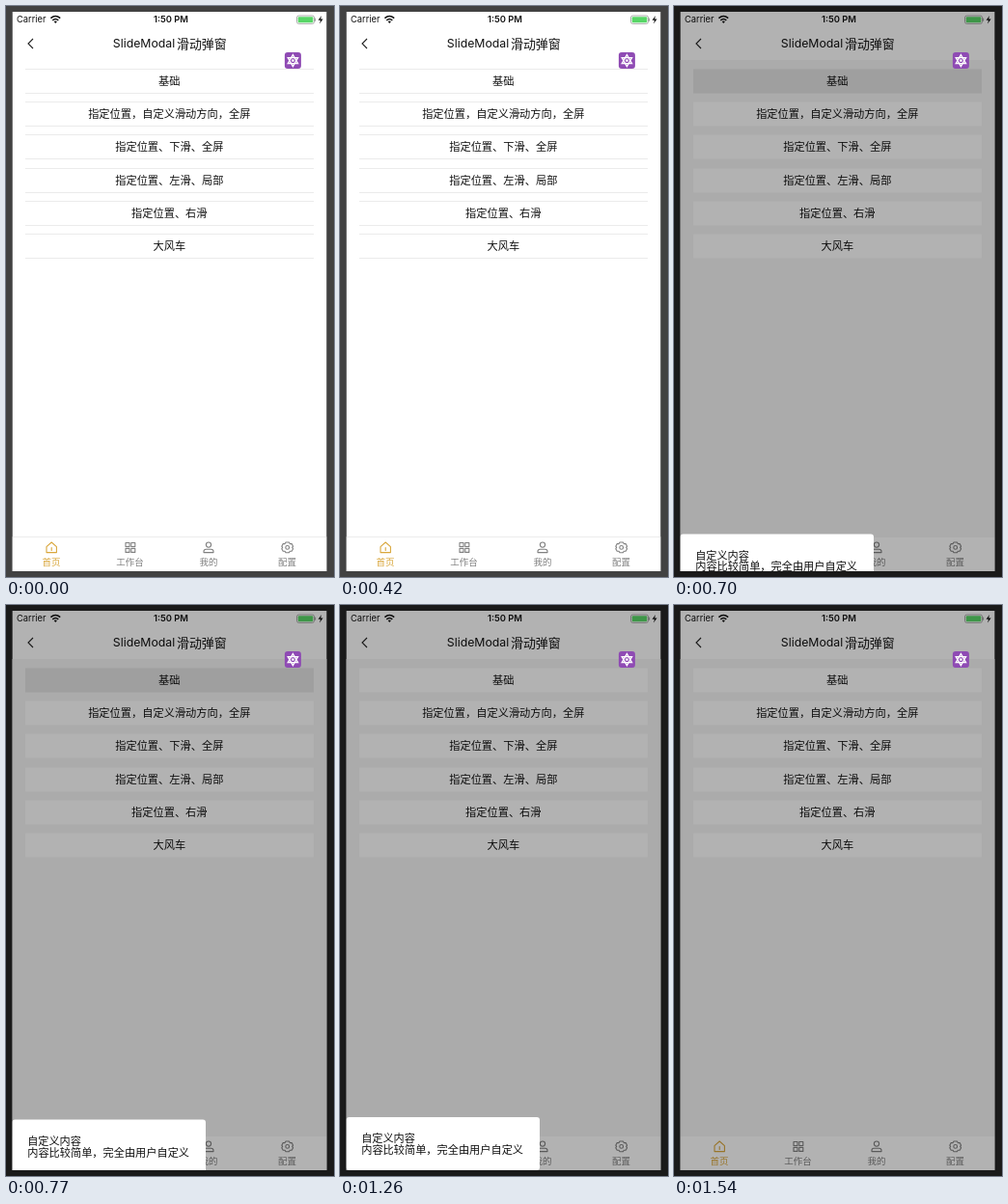
Write an HTML page that moves like this. It is 340 px wide and 592 px high and loops after 1610 ms.

```html
<!DOCTYPE html>
<html lang="zh-CN">
<head>
<meta charset="utf-8">
<title>SlideModal</title>
<style>
  html, body { margin: 0; width: 100%; height: 100%; overflow: hidden; }
  svg { display: block; width: 340px; height: 592px; }
  text { font-family: Inter, "Noto Sans CJK SC", "Noto Sans CJK", sans-serif; fill: #111; }
  .mid { text-anchor: middle; }
  .line { fill: none; stroke: #808080; stroke-width: 1.1; stroke-linejoin: round; stroke-linecap: round; }
</style>
</head>
<body>
<svg viewBox="0 0 340 592">
  <defs>
    <clipPath id="screen"><rect x="6.5" y="6" width="326" height="580"/></clipPath>
  </defs>
  <rect id="bezel" width="340" height="592"/>
  <g clip-path="url(#screen)">
    <rect x="6.5" y="6" width="326" height="580" fill="#fff"/>
    <rect id="body" x="6.5" y="56" width="326" height="495" fill="#f4f4f4"/>

    <text x="11" y="17.3" font-size="9.3">Carrier</text>
    <g fill="none" stroke="#111" stroke-width="1.6">
      <path d="M46.4 12.7Q51.3 8.3 56.2 12.7"/>
      <path d="M48.3 14.8Q51.3 12.2 54.3 14.8"/>
    </g>
    <path d="M49.6 16.1Q51.3 14.9 53 16.1L51.3 17.9Z" fill="#111"/>
    <text class="mid" x="171" y="17.4" font-size="9.4" font-weight="600">1:50 PM</text>
    <rect x="301.5" y="10" width="18" height="8.4" rx="2" fill="#fff" stroke="#999" stroke-width=".8"/>
    <rect x="302.7" y="11.2" width="15.6" height="6" rx="1" fill="#58d667"/>
    <path d="M320.6 12.6V15.8" stroke="#999"/>
    <path d="M327 10L323.6 14.7H326L325 18.4L328.6 13.4H326.2Z" fill="#111"/>

    <path d="M28 34L23 39L28 44" fill="none" stroke="#222" stroke-width="1.1"/>
    <text x="110.8" y="43.4" font-size="12.3">SlideModal</text>
    <text x="177" y="43.6" font-size="12.9">滑动弹窗</text>

    <g id="rows"></g>

    <rect x="6.5" y="551" width="326" height="36" fill="#fff"/>
    <path id="tabEdge" d="M6.5 550.5H332.5" stroke="#ececec"/>
    <path class="line" style="stroke:#d9a73c" d="M42 560.6L47.2 556L52.4 560.6V566.6H42ZM47.2 561.6V564.4"/>
    <path class="line" d="M124 556.5h4v4h-4zM129.8 556.5h4v4h-4zM124 562.4h4v4h-4zM129.8 562.4h4v4h-4z"/>
    <g class="line">
      <circle cx="210" cy="558.6" r="2.6"/>
      <path d="M205 566.6V565.4Q205 563.2 207.4 563.2H212.6Q215 563.2 215 565.4V566.6Z"/>
      <path d="M290 556H293.4L294.3 557.6H296.2L297.6 560.2L296.7 561.4L297.6 562.8L296.2 565.2H294.3L293.4 566.8H290L289.1 565.2H287.2L285.8 562.8L286.7 561.4L285.8 560.2L287.2 557.6H289.1Z"/>
      <circle cx="291.7" cy="561.4" r="1.9"/>
    </g>
    <g id="tabs"></g>

    <rect id="dim" x="6.5" y="6" width="326" height="580" fill="#000" opacity=".3"/>

    <g id="badge" transform="translate(297.4 56.6)">
      <rect x="-8.5" y="-8.5" width="17" height="17" rx="3" fill="#8f4bb4"/>
      <path d="M0 -6L5.2 3H-5.2ZM0 6L5.2 -3H-5.2Z" fill="none" stroke="#fff" stroke-width="1.3"/>
      <circle r="1.3" fill="#fff"/>
    </g>

    <g id="modal">
      <rect x="6.5" y="531" width="200.5" height="55" rx="3" fill="#fff"/>
      <text x="22.2" y="557.2" font-size="11.15">自定义内容</text>
      <text x="22.2" y="569" font-size="11.2">内容比较简单，完全由用户自定义</text>
    </g>
  </g>
</svg>
<script>
const LOOP = 1610, STEP = 70, OPEN = 490, MODAL_HEIGHT = 56;
const $ = id => document.getElementById(id);

function add(parent, tag, attrs, text = "") {
  const node = document.createElementNS("http://www.w3.org/2000/svg", tag);
  for (const key in attrs) node.setAttribute(key, attrs[key]);
  node.textContent = text;
  return parent.appendChild(node);
}

const labels = ["基础", "指定位置，自定义滑动方向，全屏", "指定位置、下滑、全屏",
  "指定位置、左滑、局部", "指定位置、右滑", "大风车"];
const rows = labels.map((label, i) => {
  const y = 65.5 + Math.round(i * 34.2);
  return {
    box: add($("rows"), "rect", { x: 20, y, width: 299, height: 25, fill: "#fff" }),
    edge: add($("rows"), "path", { d: `M20 ${y}H319M20 ${y + 25}H319`, stroke: "#ebebeb" }),
    text: add($("rows"), "text", { class: "mid", x: 169.3, y: y + 16.7, "font-size": 11.22 }, label)
  };
});

["首页", "工作台", "我的", "配置"].forEach((label, i) =>
  add($("tabs"), "text", {
    class: "mid", x: 47 + i * 81.5, y: 579.8, "font-size": 9.5,
    style: `fill:${i ? "#808080" : "#d9a73c"}`
  }, label));

const clamp = v => Math.min(1, Math.max(0, v));
const progress = (t, start, length) => clamp((t - start) / length);
const easeInOut = p => p < .5 ? 2 * p * p : 1 - 2 * (1 - p) ** 2;
const show = (node, on) => node.setAttribute("visibility", on ? "visible" : "hidden");

function draw(time) {
  const t = Math.min(Math.floor(time / STEP) * STEP, LOOP - STEP);
  const open = t >= OPEN;
  $("bezel").setAttribute("fill", open ? "#1a1a1a" : "#424242");
  show($("dim"), open);
  show($("body"), open);
  show($("tabEdge"), !open);
  rows.forEach(row => show(row.edge, !open));

  // The pressed row fades its label, then flashes darker before settling.
  const flash = t > OPEN && t < 840;
  rows[0].box.setAttribute("fill", flash ? "#e4e4e4" : "#fff");
  rows[0].text.setAttribute("opacity", open ? .3 + .7 * progress(t, OPEN, 210) : 1);

  // Slide up, rest, then slide back down; the last step is fully closed.
  const shown = easeInOut(progress(t, 515, 300)) - easeInOut(progress(t, 1350, 190));
  $("modal").setAttribute("transform", `translate(0 ${MODAL_HEIGHT * (1 - shown)})`);
  show($("modal"), shown > 0);
}

function tick(now) {
  draw(now % LOOP);
  requestAnimationFrame(tick);
}
draw(0);
requestAnimationFrame(tick);
</script>
</body>
</html>
```
